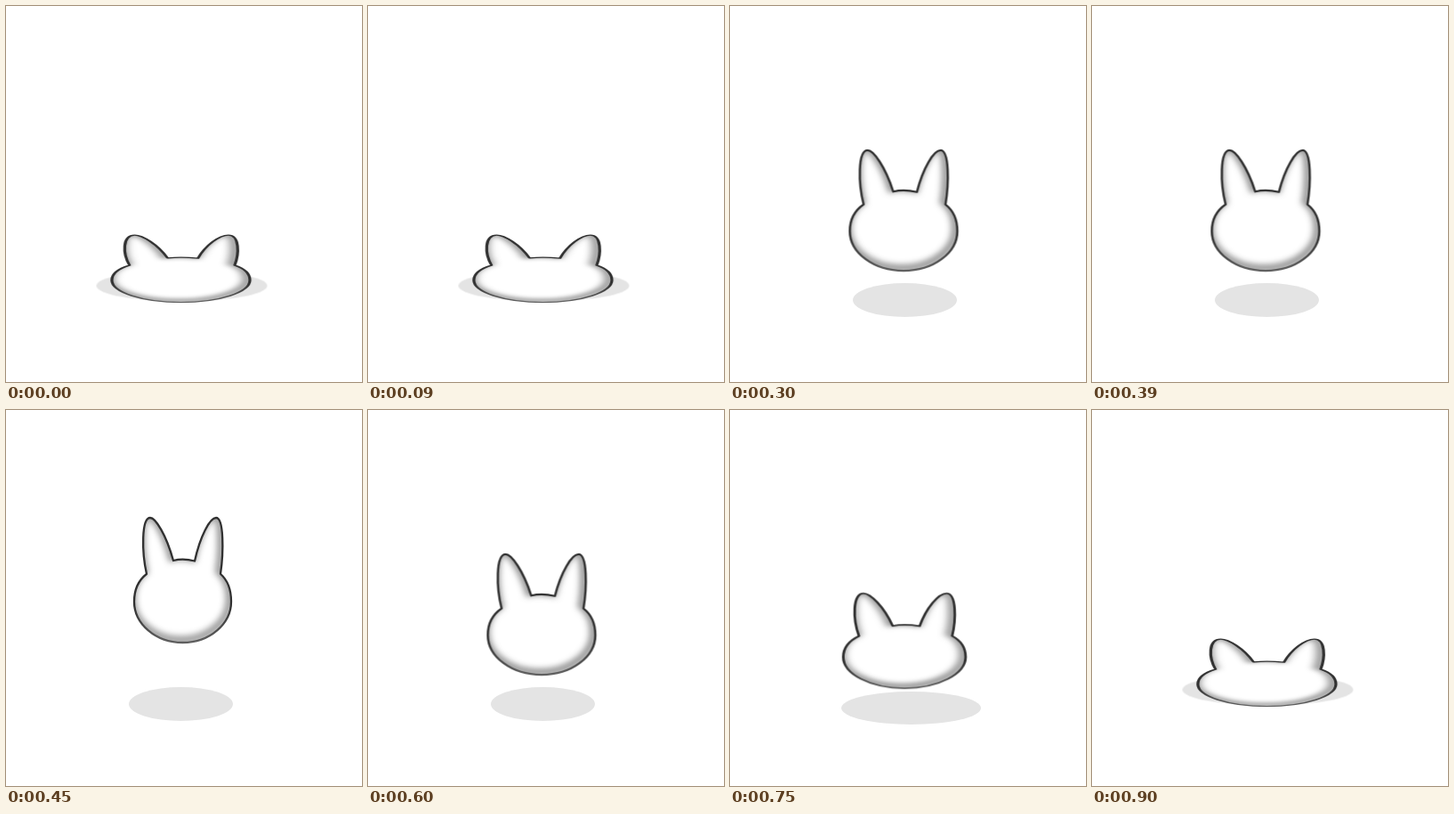
These frames come from a looping animation (400x422 px, 1.05 s). An HTML page:

```html
<!DOCTYPE html>
<html lang="en">
<head>
<meta charset="utf-8">
<title>Bouncing bunny</title>
<style>
  html, body { margin: 0; width: 100%; height: 100%; overflow: hidden; background: #fff; }
  svg { display: block; width: 400px; height: 422px; }
  #bunny, #shadow { animation: bounce 1050ms step-end infinite; transform-origin: 0 0; }
  #shadow { animation-name: ground; fill: #dfdfdf; }

  /* Seven equal holds: squashed, rising, high, top, and back */
  @keyframes bounce {
    0%, 85.71%, 100% { transform: translate(117.5px, 256.5px) scale(1.423, .539); }
    14.28%, 71.42% { transform: translate(126px, 205px) scale(1.261, .761); }
    28.57%, 57.14% { transform: translate(133.5px, 161px) scale(1.108, .965); }
    42.85% { transform: translate(143px, 120px); }
  }
  @keyframes ground {
    0%, 85.71%, 100% { transform: translate(197.5px, 314px) scale(96, 17.5); fill: #e4e4e4; }
    14.28%, 71.42% { transform: translate(203.5px, 334.5px) scale(78.5, 18.5); }
    28.57%, 57.14%, 42.85% { transform: translate(196.5px, 330px) scale(58.5, 19); }
  }
</style>
</head>
<body>
<svg viewBox="0 0 400 422">
  <defs>
    <path id="head" d="M15 64 C9.5 40 9 1 19 1 C25 1 37 20 45 49 Q56 46 69 49.5
      C75 22 86 1 93 1 C102 1 101.5 40 98 64 C106 71 110 82 110 95
      C110 120 86 141 55.5 141 C25 141 1 120 1 95 C1 82 6 71 15 64Z"/>
    <clipPath id="inside"><use href="#head"/></clipPath>
    <filter id="soft" filterUnits="userSpaceOnUse" x="-30" y="-30" width="171" height="202">
      <feGaussianBlur stdDeviation="3.5"/>
    </filter>
    <linearGradient id="ink" gradientUnits="userSpaceOnUse" x1="0" y1="100" x2="0" y2="142">
      <stop stop-color="#303030"/>
      <stop offset="1" stop-color="#606060"/>
    </linearGradient>
  </defs>
  <circle id="shadow" r="1"/>
  <g id="bunny" fill="none">
    <use href="#head" fill="#fff"/>
    <g clip-path="url(#inside)">
      <use href="#head" x="-2" y="-3" stroke="#000" stroke-opacity=".42" stroke-width="8" filter="url(#soft)"/>
    </g>
    <use href="#head" stroke="url(#ink)" stroke-width="2.3" stroke-linejoin="round"/>
  </g>
</svg>
</body>
</html>
```
